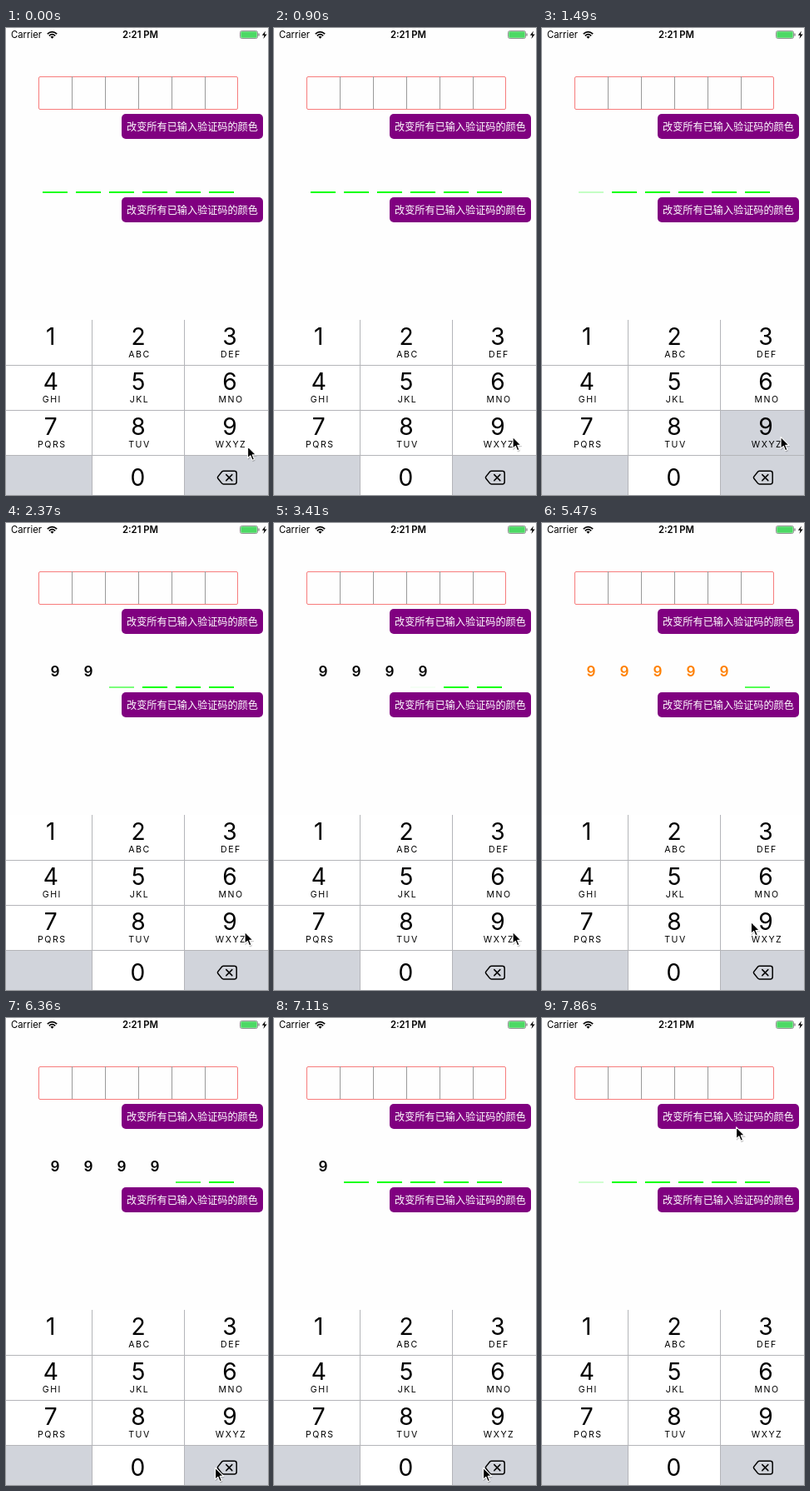
Recreate the animation shown at these times as an HTML page. Size 315 by 560 pixels, loop 8000 ms.

```html
<!DOCTYPE html>
<html lang="zh">
<head>
<meta charset="utf-8">
<title>Code input</title>
<style>
html, body { margin: 0; width: 100%; height: 100%; overflow: hidden; background: #fefefe; }
svg { display: block; width: 100%; height: 100%; }
text { font-family: Inter, Roboto, sans-serif; text-anchor: middle; }
.bar { font-size: 11.3px; }
.code { font-size: 17.2px; font-weight: 600; }
.num { font-size: 28.2px; }
.abc { font-size: 10.6px; letter-spacing: 1.5px; }
.btn { font: 12.15px "Noto Sans CJK SC", "Noto Sans CJK", sans-serif; fill: #fff; }
</style>
</head>
<body>
<svg id="stage" viewBox="0 0 315 560" xmlns="http://www.w3.org/2000/svg"></svg>
<script>
const LOOP = 8000, STEP = LOOP / 54;
const BLINK = 960, FADE = 200;
const stage = document.getElementById('stage');

function add(tag, attrs, text) {
  const el = document.createElementNS(stage.namespaceURI, tag);
  for (const k in attrs) el.setAttribute(k, attrs[k]);
  if (text) el.textContent = text;
  stage.appendChild(el);
  return el;
}
const rect = (x, y, width, height, fill, rx = 0) => add('rect', { x, y, width, height, fill, rx });
const path = (d, attrs) => add('path', { d, fill: 'none', ...attrs });
const label = (x, y, cls, text) => add('text', { x, y, class: cls }, text);

rect(0, 0, 315, 560, '#fefefe');

// Status bar
label(24.5, 12.2, 'bar', 'Carrier');
label(161.5, 12.2, 'bar', '2:21 PM').setAttribute('font-weight', 600);
path('M49.8 7.2Q55.5 1.9 61.2 7.2M51.8 9.3Q55.5 5.9 59.2 9.3', { stroke: '#000', 'stroke-width': 1.7 });
path('M53.4 10.6Q55.5 8.9 57.6 10.6L55.5 12.8Z', { fill: '#000' });
add('rect', { x: 281.5, y: 3.5, width: 21, height: 9, rx: 2, fill: '#fefefe', stroke: '#777', 'stroke-width': .8 });
rect(282.3, 4.3, 19.4, 7.4, '#4cd964', 1.2);
rect(303.4, 6.3, 1.2, 3.4, '#777', .6);
path('M312 3.5L307.8 8.8H310.5L309.4 13L313.7 7.4H310.9Z', { fill: '#000' });

// Boxed field
add('rect', { x: 39.5, y: 58.5, width: 239, height: 39, rx: 1.5, fill: 'none', stroke: '#f77c7c' });
for (let x = 79.5; x < 270; x += 40) path(`M${x} 58V97`, { stroke: '#999' });

// Underlined field
const lines = [], digits = [];
for (let i = 0; i < 6; i++) {
  lines.push(rect(44 + 40 * i, 196, 30, 2, '#0f0'));
  digits.push(label(59 + 40 * i, 183.8, 'code', '9'));
}

for (const y of [103, 203]) {
  rect(139, y, 170, 30, '#800080', 5);
  label(224, y + 19.6, 'btn', '改变所有已输入验证码的颜色');
}

// Keypad
const GREY = '#d1d4db';
rect(0, 350, 315, 210, '#fff');
rect(0, 513, 103, 47, GREY);
const delKey = rect(215, 513, 100, 47, GREY);
const nineKey = rect(215, 459, 100, 53, GREY);
path('M0 404.5H315M0 458.5H315M0 512.5H315M103.5 350V560M214.5 350V560', { stroke: '#b4b5b9' });
const letters = ['', 'ABC', 'DEF', 'GHI', 'JKL', 'MNO', 'PQRS', 'TUV', 'WXYZ'];
letters.forEach((abc, i) => {
  const x = [53.8, 159, 269][i % 3], y = 380 + 54 * Math.floor(i / 3);
  label(x, y, 'num', String(i + 1));
  label(x + 1.5, y + 15, 'abc', abc);
});
label(158.5, 549.3, 'num', '0');
path('M261.5 531.2H274.5Q277.2 531.2 277.2 533.9V544.3Q277.2 547 274.5 547H261.5Q260.4 547 259.6 546.1L254.9 540.3Q254 539.1 254.9 537.9L259.6 532.1Q260.4 531.2 261.5 531.2Z' +
  'M264.8 535.6L271.8 542.6M271.8 535.6L264.8 542.6', { stroke: '#000', 'stroke-width': 1.5, 'stroke-linecap': 'round' });

const pointer = add('g', { 'stroke-linejoin': 'round' });
const arrow = 'M.6 .8V14.8L3.8 11.8L6.1 17.2L8.5 16.2L6.2 10.9H10.6Z';
pointer.append(
  path(arrow, { fill: '#000', opacity: .2, transform: 'translate(.6 1.4)', stroke: '#000' }),
  path(arrow, { fill: '#000', stroke: '#fff', 'stroke-width': 1.1 }));

// [time, digits entered]
const edits = [[-110, 0], [1540, 1], [2135, 2], [2930, 3], [3330, 4], [3750, 5],
  [6200, 4], [6500, 3], [6780, 2], [7010, 1], [7236, 0]];
const ORANGE = [4900, 6200];
const nineDown = [[1400, 1540], [2880, 2980], [3660, 3750]];
// [time, x, y]
const moves = [[100, 290, 501], [290, 286.5, 489.5], [4050, 286.5, 489.5], [4650, 250, 217],
  [5200, 250, 217], [5590, 251, 538.5], [7480, 251, 538.5], [7850, 233, 130]];

const within = (t, [a, b]) => t >= a && t < b;
const blink = age => .5 + .5 * Math.cos(2 * Math.PI * age / BLINK);

function pointerAt(t) {
  const n = moves.findIndex(m => m[0] > t);
  if (n < 1) return moves[n ? moves.length - 1 : 0].slice(1);
  const a = moves[n - 1], b = moves[n];
  const s = (t - a[0]) / (b[0] - a[0]), e = s * s * (3 - 2 * s);
  return [a[1] + (b[1] - a[1]) * e, a[2] + (b[2] - a[2]) * e];
}

function draw(t) {
  let n = edits.length - 1;
  while (edits[n][0] > t) n--;
  const [since, count] = edits[n], age = t - since;
  const typed = n > 0 && edits[n - 1][1] < count;
  const ink = within(t, ORANGE) ? '#ff8000' : '#000';

  lines.forEach((line, i) => {
    let alpha = i > count ? 1 : 0;
    if (i === count) alpha = blink(age);
    else if (typed && i === count - 1)
      alpha = blink(since - edits[n - 1][0]) * Math.max(0, 1 - age / FADE);
    line.setAttribute('opacity', alpha);
    digits[i].setAttribute('opacity', i < count ? 1 : 0);
    digits[i].setAttribute('fill', ink);
  });

  nineKey.setAttribute('opacity', nineDown.some(p => within(t, p)) ? 1 : 0);
  delKey.setAttribute('fill', n > 5 && age < 100 ? '#fff' : GREY);
  pointer.setAttribute('transform', `translate(${pointerAt(t)})`);
}

function tick() {
  const t = performance.now() % LOOP;
  draw(Math.min(53, Math.floor((t + 15) / STEP)) * STEP);
  requestAnimationFrame(tick);
}
tick();
</script>
</body>
</html>
```
